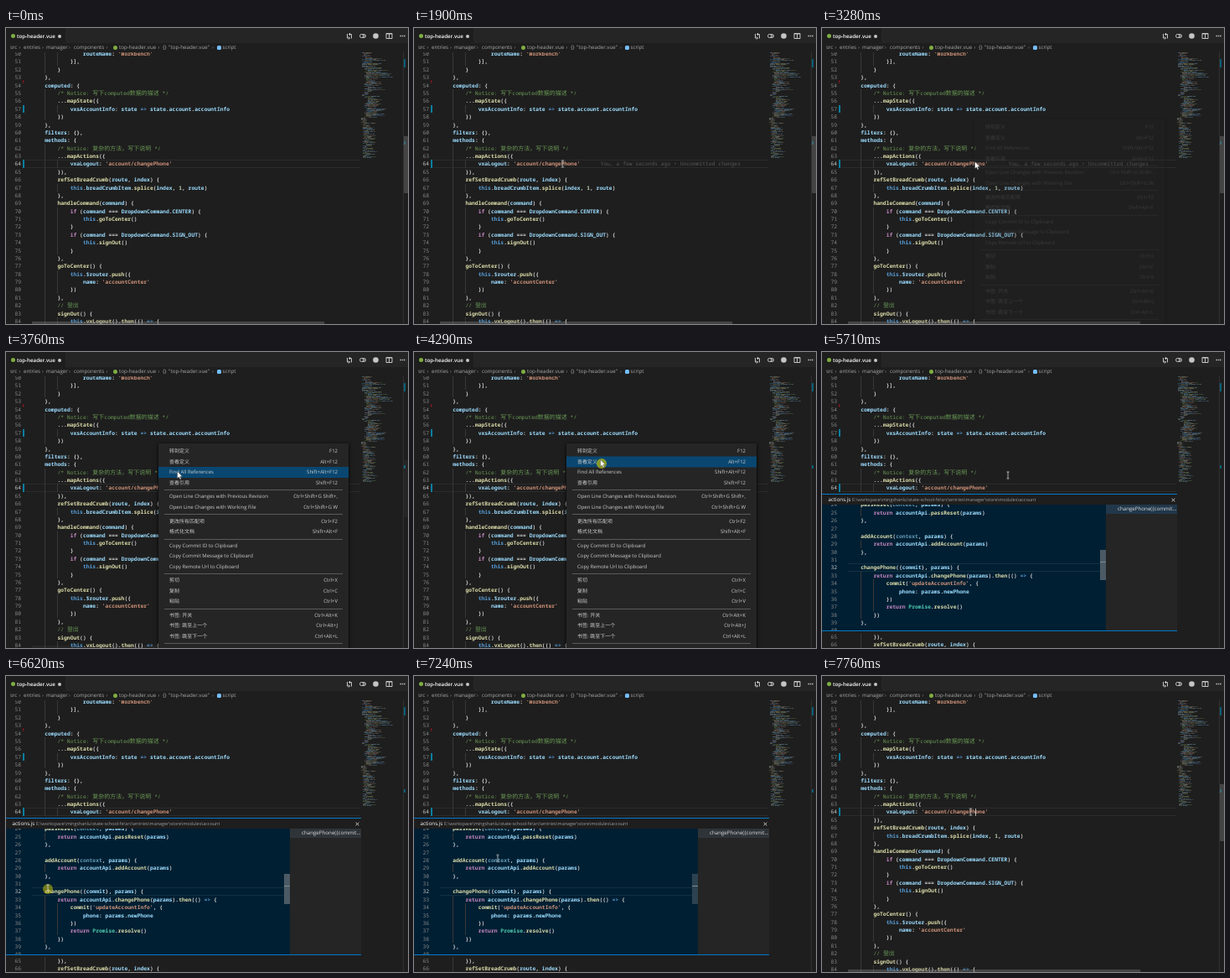
An HTML page with a canvas for the animation above (8000 ms loop, 480x353 px).

```html
<!DOCTYPE html>
<html lang="en">
<head>
<meta charset="utf-8">
<title>Peek definition</title>
<style>
html, body { margin: 0; width: 100%; height: 100%; overflow: hidden; background: #1e1e1e; }
div { left: 0; top: 0; }
#stage {
  position: relative; width: 480px; height: 353px; overflow: hidden; background: #1e1e1e;
  color: #d4d4d4; text-rendering: geometricPrecision; white-space: pre;
  --ui: "Open Sans", "Noto Sans CJK SC", "Noto Sans CJK", sans-serif;
}
#stage div, #stage canvas, #stage svg, .at { position: absolute; }
.at { font: 6.2px/10px var(--ui); }

/* code rows */
#editor { top: 29px; width: 480px; height: 324px; overflow: hidden; }
.row { height: 9.38px; font: 6.35px/9.38px "Noto Sans Mono", "Noto Sans CJK SC", monospace; }
.row .no { width: 18px; text-align: right; color: #858585; }
.row .on { color: #c6c6c6; }
.row .code { left: 31px; font-weight: 600; }
.row .guide {
  left: 31px; height: 9.38px;
  background: repeating-linear-gradient(90deg, #383838 0 .5px, transparent .5px 15.24px);
}
.row i { font: 400 7px/0 "Noto Sans CJK SC", "Noto Sans CJK", sans-serif; }
.cm { color: #6a9955; font-weight: 400; } .st { color: #ce9178; } .kw { color: #569cd6; } .ct { color: #c586c0; }
.fn { color: #dcdcaa; } .nu { color: #b5cea8; } .cl { color: #4ec9b0; } .id { color: #9cdcfe; }
.current { border: solid #2b2b2b; border-width: 1px 0; height: 8px; }
.edit { left: 20px; width: 1.5px; height: 9.4px; background: #0c7d9d; }

/* title bar */
#tabs { width: 480px; height: 17.5px; background: #252526; }
#tab { width: 71px; height: 17.5px; background: #1e1e1e; }
.vue { width: 5px; height: 5px; border-radius: 50%; background: #7fae42; }

/* context menu */
#menu {
  left: 182px; top: 109px; width: 227px; height: 250px; background: #252526; color: #ccc;
  box-shadow: 0 1px 4px #000; animation: menu 8s linear infinite;
}
.item { width: 227px; height: 12.5px; font: 6px/12.5px var(--ui); }
.item b { position: absolute; font-weight: 400; left: 13px; }
.item b + b { left: auto; right: 13px; }
.sep { left: 7px; width: 213px; height: .6px; background: #5a5a5a; }
#hover { top: 3.3px; width: 227px; height: 12.4px; background: #094771; animation: hover 8s step-end infinite; }

/* peek panel */
#peek { top: 168.6px; width: 424px; height: 164.4px; background: #1e1e1e; animation: peek 8s step-end infinite; }
#peekBody { top: 13.6px; width: 339px; height: 150px; overflow: hidden; background: #001f33; }
#refs { left: 339px; top: 13.6px; width: 85px; height: 150px; background: #252526; }
#pick { width: 85px; height: 10.8px; background: #21374a; animation: pick 8s step-end infinite; }
.edge { width: 424px; height: 1px; background: #007acc; }
#peekThumb { left: 332px; top: 54px; width: 7px; height: 35.5px; background: #4b5a64; animation: thumb 8s linear infinite; }
.dim { animation: dim 8s step-end infinite; }

#after { animation: shift 8s step-end infinite; }
#blame { left: 222.5px; color: #565656; animation: blame 8s step-end infinite; }
#caret { top: 157.8px; width: 1px; height: 9px; background: #aeafad; animation: caret 8s step-end infinite; }
.bar { background: rgba(121,121,121,.42); animation: bar 8s linear infinite; }

#mouse { animation: path 8s linear infinite; }
#beam { left: -3px; top: -5px; animation: beam 8s step-end infinite; }
#arrow { left: -2px; top: -4px; animation: arrow 8s step-end infinite; }
#press { left: -6px; top: -5px; width: 12px; height: 12px; border-radius: 50%; background: rgba(225,215,0,.6); animation: press 8s step-end infinite; }

@keyframes menu { 0%, 40.8% { opacity: 0; } 42.1%, 54.6% { opacity: 1; } 54.61%, 100% { opacity: 0; } }
@keyframes hover {
  0% { opacity: 0; transform: translateY(37.5px); }
  43.5% { opacity: 1; transform: translateY(37.5px); }
  46.2% { opacity: 1; transform: translateY(25px); }
  48.2%, 100% { opacity: 1; transform: translateY(12.5px); }
}
@keyframes peek { 0% { opacity: 0; } 55.6% { opacity: 1; } 96.9%, 100% { opacity: 0; } }
@keyframes shift { 0% { transform: none; } 55.6% { transform: translateY(168.2px); } 96.9%, 100% { transform: none; } }
@keyframes pick { 0% { background: #21374a; } 80.5%, 100% { background: #2f3439; } }
@keyframes thumb { 0%, 64.49% { opacity: 0; } 64.5%, 87.5% { opacity: 1; } 95%, 100% { opacity: 0; } }
@keyframes dim { 0% { opacity: 1; } 62.1%, 100% { opacity: .65; } }
@keyframes blame { 0% { opacity: 0; } 14.75% { opacity: 1; } 58.5%, 100% { opacity: 0; } }
@keyframes caret {
  0% { opacity: 0; left: 198px; } 14.75% { opacity: 1; left: 198px; } 21% { opacity: 0; left: 198px; }
  27.3% { opacity: 1; left: 198px; } 33% { opacity: 0; left: 183px; } 38.1% { opacity: 1; left: 183px; }
  40.5% { opacity: 0; left: 183px; } 96.9%, 100% { opacity: 1; left: 183px; }
}
@keyframes bar { 0%, 42.5% { opacity: 1; } 48%, 96.89% { opacity: 0; } 96.9%, 100% { opacity: 1; } }
@keyframes path {
  0%, 2.5% { transform: translate(474px, 288px); }
  4.4% { transform: translate(287px, 85px); }
  6.4%, 12.25% { transform: translate(229.5px, 169px); }
  19.1%, 23.8% { transform: translate(177.5px, 162px); }
  28.75% { transform: translate(240px, 101px); }
  33.4% { transform: translate(186px, 158px); }
  35.2%, 38.1% { transform: translate(185px, 162px); }
  39.1%, 42.5% { transform: translate(184px, 163px); }
  50.7%, 67.5% { transform: translate(224px, 132px); }
  71.4% { transform: translate(222px, 147px); }
  75%, 76.9% { transform: translate(131px, 266px); }
  80.5%, 87.5% { transform: translate(50px, 253px); }
  95.2%, 100% { transform: translate(177.5px, 162px); }
}
@keyframes beam { 0% { opacity: 0; } 2.5% { opacity: 1; } 34.4% { opacity: 0; } 54.6%, 100% { opacity: 1; } }
@keyframes arrow { 0% { opacity: 0; } 34.4% { opacity: 1; } 54.6%, 100% { opacity: 0; } }
@keyframes press { 0% { opacity: 0; } 52.8% { opacity: 1; } 54.6% { opacity: 0; } 81.5% { opacity: .8; } 84%, 100% { opacity: 0; } }
</style>
</head>
<body>
<div id="stage">
  <div id="editor"></div>
  <canvas id="map" width="50" height="130" style="left:424px;top:29px"></canvas>
  <div style="left:474px;top:28px;width:.6px;height:325px;background:#303030"></div>
  <div style="left:475px;top:37px;width:2px;height:10px;background:#0b5f78"></div>
  <div style="left:475px;top:135px;width:2px;height:4px;background:#0b5f78"></div>
  <div class="bar" style="left:475px;top:129px;width:5px;height:68px"></div>
  <div class="bar" style="left:31px;top:350px;width:349px;height:3px"></div>

  <div id="tabs">
    <div id="tab"></div>
    <div class="vue" style="left:5.5px;top:7px"></div>
    <span class="at" style="left:13px;top:4.5px;color:#fff;font-weight:600">top-header.vue</span>
    <div style="left:61.5px;top:8px;width:4px;height:4px;border-radius:50%;background:#c5c5c5"></div>
    <svg style="left:400px;top:0" width="80" height="18" fill="none" stroke="#c5c5c5" stroke-width="1">
      <path d="M7.5 7v5h3m-1.5-1.5l1.5 1.5-1.5 1.5M12.5 12.5v-5h-3m1.5-1.5l-1.5 1.5 1.5 1.5"/>
      <rect x="22.5" y="7.5" width="7" height="4" rx="2"/><circle cx="27" cy="9.5" r="1"/>
      <circle cx="41.5" cy="9.5" r="3.3" fill="#c5c5c5" stroke="none"/>
      <path d="M54 6.5h7v6h-7zM57.5 6v6.5M54 7h7"/>
      <path d="M70.5 9.5h6" stroke-width="1.4" stroke-dasharray="1.4 .9"/>
    </svg>
  </div>
  <div id="crumbs"></div>

  <div id="peek">
    <div class="edge"></div>
    <span class="at" style="left:7.5px;top:2.5px;color:#fff">actions.js</span>
    <span class="at" style="left:36px;top:2.5px;font-size:5.45px;color:#a0a0a0">E:\workspace\mingshanlu\state-school-fe\src\entries\manager\store\modules\account</span>
    <svg style="left:416.5px;top:5px" width="5" height="5" stroke="#d0d0d0"><path d="M.7.7l3.6 3.6m0-3.6l-3.6 3.6"/></svg>
    <div id="peekBody">
      <div class="current" style="left:31px;top:70px;width:301px;border-color:#12303f"></div>
      <div id="peekThumb"></div>
      <div style="left:332px;top:68px;width:7px;height:1px;background:#7d8a90"></div>
    </div>
    <div id="refs"><div id="pick"></div><span class="at" style="left:14px;top:.3px;color:#ddd">changePhone({commit...</span></div>
    <div class="edge" style="top:auto;bottom:0"></div>
  </div>

  <div id="caret"></div>
  <div id="menu"><div id="hover"></div></div>
  <div id="mouse">
    <div id="press"></div>
    <svg id="beam" width="6" height="10" fill="none" stroke="#d8d8d8" stroke-width=".8"><path d="M1.5 1h3M3 1v8M1.5 9h3"/></svg>
    <svg id="arrow" width="8" height="12" fill="#fff" stroke="#222" stroke-width=".4"><path d="M.5.3v8.5l2-1.8 1.3 3 1.4-.6-1.3-2.9h2.7z"/></svg>
  </div>
</div>
<script>
const $ = id => document.getElementById(id);
const PITCH = 9.38, CHAR = 3.81;

const code = `                routeName: 'Workbench'
            }],
        }
    },
    computed: {
        /* Notice: 写下computed数据的描述 */
        ...mapState({
            vxsAccountInfo: state => state.account.accountInfo
        })
    },
    filters: {},
    methods: {
        /* Notice: 复杂的方法，写下说明 */
        ...mapActions({
            vxaLogout: 'account/changePhone'
        }),
        refSetBreadCrumb(route, index) {
            this.breadCrumbItem.splice(index, 1, route)
        },
        handleCommand(command) {
            if (command === DropdownCommand.CENTER) {
                this.goToCenter()
            }
            if (command === DropdownCommand.SIGN_OUT) {
                this.signOut()
            }
        },
        goToCenter() {
            this.$router.push({
                name: 'accountCenter'
            })
        },
        // 登出
        signOut() {
            this.vxLogout().then(() => {`.split('\n');

const peekCode = `    passReset(context, params) {
        return accountApi.passReset(params)
    },

    addAccount(context, params) {
        return accountApi.addAccount(params)
    },

    changePhone({commit}, params) {
        return accountApi.changePhone(params).then(() => {
            commit('updateAccountInfo', {
                phone: params.newPhone
            })
            return Promise.resolve()
        })
    },
`.split('\n');

const rules = [
  ['cm', /\/\*.*\*\/|\/\/.*/], ['st', /'[^']*'/], ['kw', /\bthis\b|=>/], ['ct', /\b(?:if|return)\b/],
  ['cl', /\bPromise\b/], ['id dim', /\bcontext\b/], ['fn', /[\w$]+(?=\()/], ['nu', /\b\d+\b/], ['id', /[A-Za-z_$][\w$]*/]
];
const lexer = new RegExp(rules.map(r => `(${r[1].source})`).join('|'), 'g');
const esc = s => s.replace(/>/g, '&gt;').replace(/[\u3000-\u9fff\uff00-\uffef]+/g, '<i>$&</i>');

function paint(line) {
  let out = '', end = 0;
  for (const m of line.matchAll(lexer)) {
    const kind = rules[m.slice(1).findIndex(Boolean)][0];
    out += esc(line.slice(end, m.index)) + `<span class="${kind}">${esc(m[0])}</span>`;
    end = m.index + m[0].length;
  }
  return out + esc(line.slice(end));
}

function add(parent, cls, style, html = '') {
  const el = document.createElement('div');
  el.className = cls;
  el.style.cssText = style;
  el.innerHTML = html;
  parent.append(el);
  return el;
}

function addRow(parent, no, top, line, active) {
  const indent = line ? line.search(/\S/) : 4;
  return add(parent, 'row', `top:${top}px`,
    `<div class="no ${no === active ? 'on' : ''}">${no}</div>` +
    `<div class="guide" style="width:${indent * CHAR - 1}px"></div><div class="code">${paint(line)}</div>`);
}

// main editor
const editor = $('editor');
const top64 = 157.4 - 29;
add(editor, 'current', `left:23px;top:${top64 - .3}px;width:400px`);
const after = add(editor, '', '');
after.id = 'after';
code.forEach((line, i) => {
  const no = 50 + i;
  addRow(no > 64 ? after : editor, no, top64 + (no - 64) * PITCH, line, 64);
});
for (const no of [57, 64]) add(editor, 'edit', `top:${top64 + (no - 64) * PITCH}px`);
add(editor, '', `left:20px;top:${top64 - 10 * PITCH - 2}px;border:2px solid transparent;border-left-color:#94151b`);
add(editor, 'row', `top:${top64}px;left:222.5px`, 'You, a few seconds ago • Uncommitted changes').id = 'blame';

// peek editor
peekCode.forEach((line, i) => addRow($('peekBody'), 24 + i, -4.8 + i * PITCH, line, 32));

// breadcrumbs
const crumbs = [[5, 'src'], [21, 'entries'], [48, 'manager'], [81, 'components'], [135, 'top-header.vue'],
  [187, '{}'], [194, '"top-header.vue"'], [258.5, 'script']];
crumbs.forEach(([x, s]) => add($('crumbs'), 'at', `left:${x}px;top:18px;color:#a9a9a9`, s));
[15.5, 43, 75, 119.5, 181.5, 246].forEach(x => add($('crumbs'), 'at', `left:${x}px;top:17.5px;color:#8a8a8a`, '›'));
add($('crumbs'), 'vue', 'left:127.5px;top:21px');
add($('crumbs'), '', 'left:251.5px;top:20.5px;width:5px;height:5px;border-radius:1.5px;background:#75beff');

// context menu, groups split by separators
const groups = [
  [['转到定义', 'F12'], ['查看定义', 'Alt+F12'], ['Find All References', 'Shift+Alt+F12'], ['查看引用', 'Shift+F12']],
  [['Open Line Changes with Previous Revision', 'Ctrl+Shift+G Shift+,'], ['Open Line Changes with Working File', 'Ctrl+Shift+G W']],
  [['更改所有匹配项', 'Ctrl+F2'], ['格式化文档', 'Shift+Alt+F']],
  [['Copy Commit ID to Clipboard'], ['Copy Commit Message to Clipboard'], ['Copy Remote Url to Clipboard']],
  [['剪切', 'Ctrl+X'], ['复制', 'Ctrl+C'], ['粘贴', 'Ctrl+V']],
  [['书签: 开关', 'Ctrl+Alt+K'], ['书签: 跳至上一个', 'Ctrl+Alt+J'], ['书签: 跳至下一个', 'Ctrl+Alt+L']]
];
let y = 3.3;
for (const group of groups) {
  for (const [label, keys = ''] of group) {
    add($('menu'), 'item', `top:${y}px`, `<b>${label}</b><b>${keys}</b>`);
    y += 12.5;
  }
  add($('menu'), 'sep', `top:${y + 2}px`);
  y += 4.1;
}

// minimap: bands of [last row, indent, reach]
const bands = [[18, 2, 22], [34, 5, 32], [48, 5, 20], [52, 2, 6], [78, 5, 22], [84, 1, 8], [126, 3, 15]];
const ctx = $('map').getContext('2d');
const tones = ['#9cdcfe', '#9cdcfe', '#dcdcaa', '#569cd6', '#ce9178', '#6a9955'];
let seed = 11;
const rnd = () => (seed = seed * 16807 % 2147483647) / 2147483647;
ctx.globalAlpha = .42;
for (let row = 0; row < 126; row++) {
  const [, indent, reach] = bands.find(b => row < b[0]);
  let x = indent + Math.floor(rnd() * 3) * 2 - 1;
  const end = x + 2 + rnd() * reach;
  while (x < end) {
    const w = 1 + rnd() * 6;
    ctx.fillStyle = tones[rnd() * tones.length | 0];
    ctx.fillRect(x, row, Math.min(w, end - x), .7);
    x += w + .7;
  }
}
</script>
</body>
</html>
```
